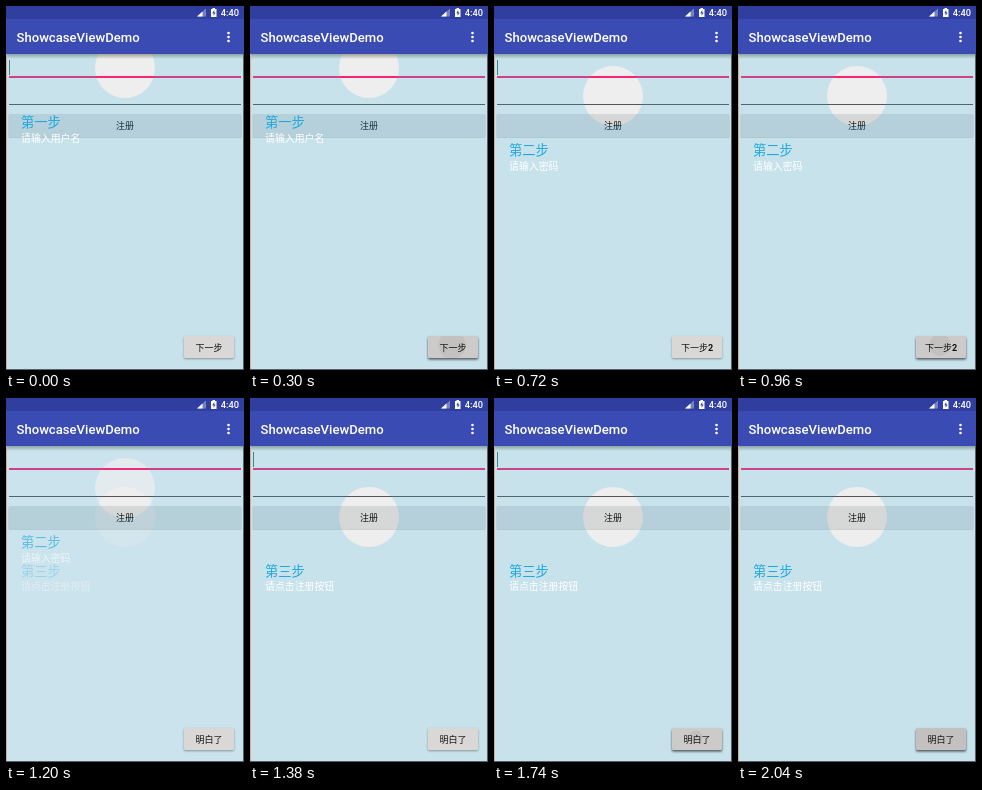
An HTML page that plays this animation: 238 px wide and 364 px high, repeating every 2.1 s.

```html
<!DOCTYPE html>
<html lang="zh-CN">
<head>
<meta charset="utf-8">
<title>ShowcaseViewDemo</title>
<style>
  html, body { margin: 0; width: 100%; height: 100%; overflow: hidden; background: #eee; }
  svg { display: block; width: 238px; height: 364px; }
  text { font-family: "Noto Sans CJK SC", "Noto Sans CJK", "Noto Sans", sans-serif; }

  .latin { font-family: Roboto, sans-serif; font-weight: 500; fill: #fff; }
  .veil { fill: #33b5e5; fill-opacity: .2; fill-rule: evenodd; }
  .head { font-size: 13.3px; fill: #1fa9de; }
  .hint { font-size: 9.9px; font-weight: 500; fill: #fff; }
  .label { font-size: 9px; font-weight: 500; fill: #111; text-anchor: middle; }

  .anim { animation: 2100ms linear infinite; }
  .hard { animation-timing-function: step-end; }

  .step1 { animation-name: step1; }
  .step2 { animation-name: step2; }
  .step3 { animation-name: step3; }
  @keyframes step1 { 0%, 20% { opacity: 1 } 29.52%, 100% { opacity: 0 } }
  @keyframes step2 { 0%, 20% { opacity: 0 } 29.52%, 54.29% { opacity: 1 } 63.81%, 100% { opacity: 0 } }
  @keyframes step3 { 0%, 54.29% { opacity: 0 } 63.81%, 100% { opacity: 1 } }

  .label1 { animation-name: label1; }
  .label2 { animation-name: label2; }
  .label3 { animation-name: label3; }
  @keyframes label1 { 0% { opacity: 1 } 22.8%, 100% { opacity: 0 } }
  @keyframes label2 { 0% { opacity: 0 } 22.8% { opacity: 1 } 57.1%, 100% { opacity: 0 } }
  @keyframes label3 { 0% { opacity: 0 } 57.1%, 100% { opacity: 1 } }

  .caret { animation-name: caret; }
  @keyframes caret {
    0% { opacity: 1 } 8.5% { opacity: 0 }
    28.5% { opacity: 1 } 45.6% { opacity: 0 }
    65.6% { opacity: 1 } 85.6%, 100% { opacity: 0 }
  }

  .press { animation-name: press; }
  @keyframes press {
    0%, 10% { opacity: 0 } 12.8%, 20% { opacity: 1 } 24%, 41.9% { opacity: 0 }
    44.3%, 53.3% { opacity: 1 } 57.1%, 79.5% { opacity: 0 } 81.9%, 100% { opacity: 1 }
  }

  .ripple { transform-origin: 202px 339px; animation-name: ripple; }
  @keyframes ripple {
    0%, 10% { transform: scale(0) } 20%, 24% { transform: scale(1) }
    24.01%, 41.9% { transform: scale(0) } 53.3%, 57.1% { transform: scale(1) }
    57.11%, 79.5% { transform: scale(0) } 96%, 100% { transform: scale(1) }
  }
</style>
</head>
<body>
<svg viewBox="0 0 238 364">
  <defs>
    <linearGradient id="shade" x2="0" y2="1">
      <stop offset="0" stop-color="#55553c" stop-opacity=".5"/>
      <stop offset="1" stop-color="#55553c" stop-opacity="0"/>
    </linearGradient>
    <filter id="soft" x="-20%" y="-40%" width="140%" height="180%">
      <feGaussianBlur stdDeviation="1"/>
    </filter>
    <clipPath id="face"><rect x="178" y="330" width="50" height="22" rx="1.5"/></clipPath>
  </defs>

  <!-- form -->
  <rect width="238" height="364" fill="#eee"/>
  <rect y="48" width="238" height="5" fill="url(#shade)"/>
  <rect class="anim hard caret" x="3" y="54" width="1" height="15" fill="#3f7c7c"/>
  <rect x="3" y="70" width="232" height="2" fill="#f5266f"/>
  <rect x="3" y="98" width="232" height="1" fill="#555"/>
  <rect x="2.5" y="109" width="233" height="23" rx="1.5" fill="#000" opacity=".13"/>
  <rect x="2.5" y="108" width="233" height="23" rx="1.5" fill="#d6d7d7"/>
  <text class="label" x="119" y="122.5">注册</text>

  <!-- showcase steps -->
  <g class="anim step1">
    <path class="veil" d="M0 13H238V364H0ZM89 62a30 30 0 0 0 60 0a30 30 0 0 0-60 0Z"/>
    <text class="head" x="15" y="121">第一步</text>
    <text class="hint" x="15" y="135.5">请输入用户名</text>
  </g>
  <g class="anim step2">
    <path class="veil" d="M0 13H238V364H0ZM89 90a30 30 0 0 0 60 0a30 30 0 0 0-60 0Z"/>
    <text class="head" x="15" y="148.5">第二步</text>
    <text class="hint" x="15" y="163.5">请输入密码</text>
  </g>
  <g class="anim step3">
    <path class="veil" d="M0 13H238V364H0ZM89 119a30 30 0 0 0 60 0a30 30 0 0 0-60 0Z"/>
    <text class="head" x="15" y="177.5">第三步</text>
    <text class="hint" x="15" y="192">请点击注册按钮</text>
  </g>

  <!-- next button -->
  <rect x="178" y="331" width="50" height="22" rx="1.5" opacity=".35" filter="url(#soft)"/>
  <rect class="anim press" x="178" y="332" width="50" height="22" rx="1.5" opacity="0"
        fill="#000" fill-opacity=".35" filter="url(#soft)"/>
  <rect x="178" y="330" width="50" height="22" rx="1.5" fill="#d9d8d6"/>
  <g class="anim press" clip-path="url(#face)">
    <rect x="178" y="330" width="50" height="22" fill-opacity=".06"/>
    <circle class="anim ripple" cx="202" cy="339" r="32" fill-opacity=".05"/>
  </g>
  <text class="label anim hard label1" x="203" y="344.5">下一步</text>
  <text class="label anim hard label2" x="203" y="344.5">下一步<tspan font-family="Roboto, sans-serif" font-weight="700">2</tspan></text>
  <text class="label anim hard label3" x="203" y="344.5">明白了</text>

  <!-- bars -->
  <rect width="238" height="13" fill="#303f9f"/>
  <rect y="13" width="238" height="35" fill="#3a4cb3"/>
  <text class="latin" x="10.5" y="35.5" font-size="13.1">ShowcaseViewDemo</text>
  <g fill="#fff">
    <circle cx="222.5" cy="27" r="1.3"/>
    <circle cx="222.5" cy="31" r="1.3"/>
    <circle cx="222.5" cy="35" r="1.3"/>
    <path d="M191 10.5L200 2.5V10.5Z" opacity=".35"/>
    <path d="M191 10.5L196.500 5.600V10.5Z"/>
    <path d="M205 3h1.500v-1h2.500v1h1.500v8h-5.500Z"/>
  </g>
  <path d="M208.300 4l-2 3.200h1.300v2.500l2-3.300h-1.300Z" fill="#303f9f"/>
  <text class="latin" x="233" y="10" font-size="9.3" text-anchor="end">4:40</text>

  <!-- screen edges -->
  <rect y="48" width="1" height="316" fill="#d8a994"/>
  <rect x="237" y="48" width="1" height="316" fill="#56626b"/>
  <rect y="363" width="238" height="1" fill="#56626b"/>
</svg>
</body>
</html>
```
